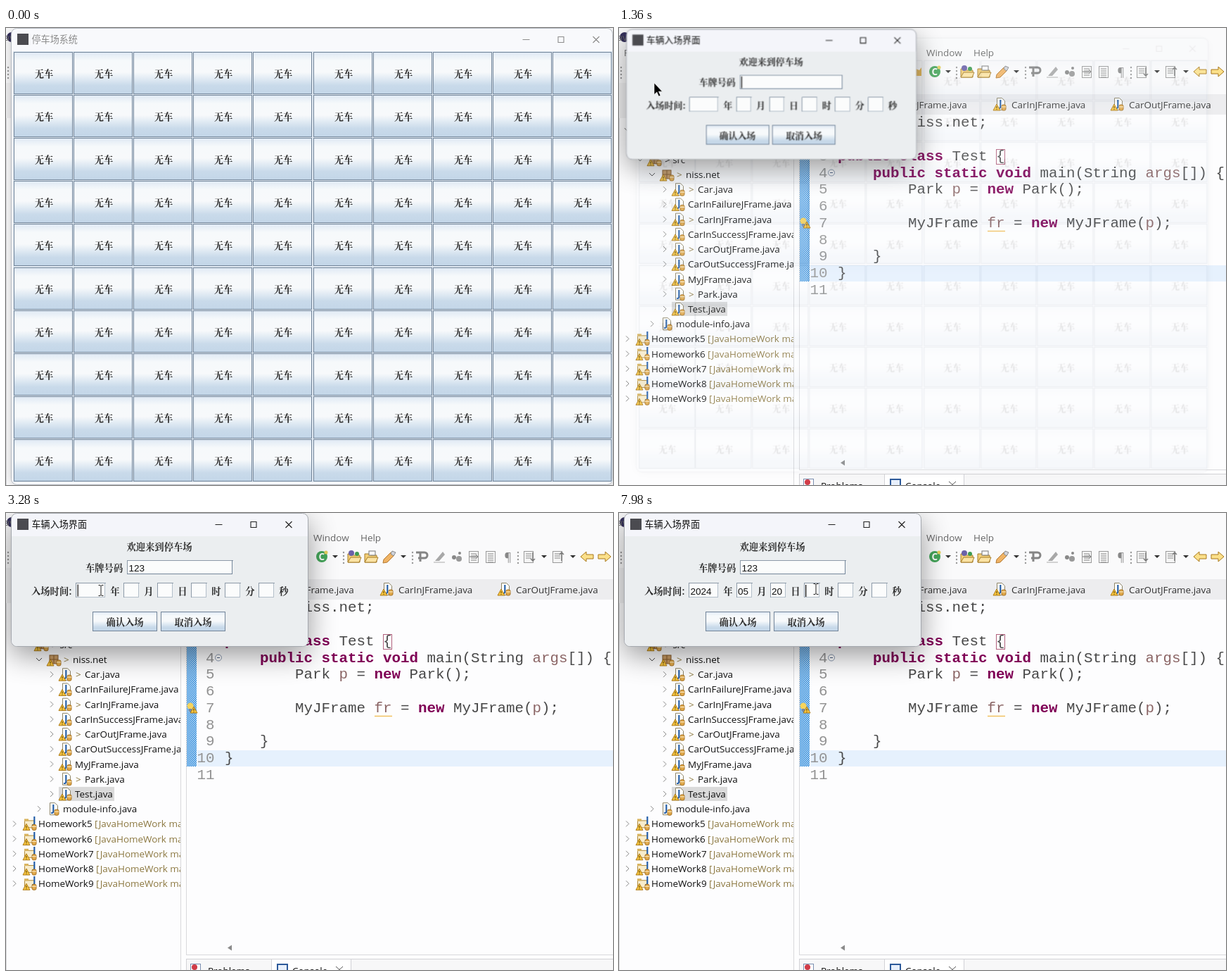
Recreate the animation shown at these times as an HTML page. Size 863x649 px, loop 8000 ms.

```html
<!DOCTYPE html>
<html lang="zh">
<head>
<meta charset="utf-8">
<title>停车场系统</title>
<style>
html, body { margin: 0; width: 100%; height: 100%; overflow: hidden; background: #fff; }
svg { display: block; width: 100%; height: 100%; }
text { white-space: pre; font: 13.45px "Open Sans", "Noto Sans", sans-serif; fill: #111; }
.menu { fill: #666; }
.tab { fill: #333; }
.decor { fill: #8c7840; }
.code { font: 20.83px "Liberation Mono", monospace; fill: #484848; }
.num { fill: #929292; text-anchor: end; }
.kw { font-weight: 700; fill: #7f0055; }
.var { fill: #8a6464; }
.j { font-weight: 700; font-size: 14px; fill: #1f5aa6; }
.title { font: 13.1px "Noto Sans CJK SC", "Noto Sans CJK", sans-serif; }
.song { font: 700 13.3px "Noto Serif CJK SC", "Noto Sans CJK SC", "Noto Sans CJK", serif; fill: #2b2b2b; }
.mid { text-anchor: middle; }
.field { font: 13.5px "Liberation Sans", sans-serif; }
.crisp { shape-rendering: crispEdges; }
#main { transform-origin: 355px 280px; }
#dialog { transform-origin: 142px 60px; }
</style>
</head>
<body>
<svg id="stage" viewBox="0 0 863 649" xmlns="http://www.w3.org/2000/svg"></svg>
<script>
const LOOP = 8000;
const sheet = [];

const range = n => [...Array(n).keys()];
const rect = (x, y, w, h, fill, more = '') =>
  `<rect x="${x}" y="${y}" width="${w}" height="${h}" fill="${fill}" ${more}/>`;
const path = (d, stroke, more = '') => `<path d="${d}" fill="none" stroke="${stroke}" ${more}/>`;
const shape = (d, fill, more = '') => `<path d="${d}" fill="${fill}" ${more}/>`;
const dot = (x, y, r, fill) => `<circle cx="${x}" cy="${y}" r="${r}" fill="${fill}"/>`;
const text = (x, y, s, cls = '', more = '') => `<text x="${x}" y="${y}" class="${cls}" ${more}>${s}</text>`;
const group = (id, body) => `<g id="${id}">${body}</g>`;

// Holds each declaration from its time until the next one.
function track(id, steps) {
  const frames = steps.map(([ms, css]) => `${+(ms / LOOP * 100).toFixed(4)}%{${css}}`).join('');
  sheet.push(`@keyframes ${id}{${frames}100%{${steps.at(-1)[1]}}}#${id}{animation:${id} ${LOOP}ms step-end infinite}`);
}
const showFrom = (id, ms) => track(id, [[0, 'opacity:0'], [ms, 'opacity:1']]);

// ---------- IDE behind the windows ----------
const warning = (x, y) =>
  shape(`M${x} ${y - 8}l5 9h-10z`, '#f6c540', 'stroke="#a8720c" stroke-width=".9"') +
  path(`M${x} ${y - 5}v3m0 1v1`, '#4a3500');
const drum = (x, y) =>
  rect(x, y, 6, 8, '#e0a94c', 'rx="2" stroke="#a06a1a" stroke-width=".9"') + path(`M${x} ${y + 3}h6`, '#fff2d0');
const fileIcon = (x, y, warn = true) =>
  shape(`M${x + 4.5} ${y - 8.5}h7l4 4v13h-11z`, '#fdfdfa', 'stroke="#8d8468"') +
  text(x + 7, y + 4, 'J', 'j') + drum(x + 11, y + 1) + (warn ? warning(x + 4, y + 8) : '');
const projectIcon = (x, y) =>
  rect(x + 2.5, y - 4.5, 14, 10, '#f8eccb', 'stroke="#b08a3a" rx="1"') + rect(x + 2, y - 7, 6, 3, '#d9b45e') +
  text(x + 14, y, 'J', 'j') + warning(x + 5, y + 8) + drum(x + 13, y + 1);
const packageIcon = (x, y) =>
  rect(x + 3, y - 6, 12, 12, '#c79a63', 'stroke="#855a2b"') + path(`M${x + 9} ${y - 6}v12M${x + 3} ${y}h12`, '#855a2b') +
  warning(x + 4, y + 8) + drum(x + 13, y + 1);
const chevron = (x, y, open) =>
  path(open ? `M${x - 4} ${y - 2}l4 4l4-4` : `M${x - 2} ${y - 4}l4 4l-4 4`, open ? '#444' : '#8a8a8a');

function tree() {
  const rowY = i => 144.3 + i * 21.22;
  const project = (i, name, open) => chevron(12, rowY(i), open) + projectIcon(24, rowY(i)) +
    text(46, rowY(i) + 5, `${name} <tspan class="decor">[JavaHomeWork main]</tspan>`);
  const files = ['> Car', 'CarInFailureJFrame', '> CarInJFrame', 'CarInSuccessJFrame', '> CarOutJFrame',
    'CarOutSuccessJFrame', 'MyJFrame', '> Park', 'Test'];
  let out = project(0, '&gt; HomeWork10', true);
  out += chevron(30, rowY(1)) + rect(43, rowY(1) - 5, 16, 10, '#5e7fa8') +
    text(63, rowY(1) + 5, 'JRE System Library <tspan class="decor">[JavaSE-17]</tspan>');
  out += chevron(30, rowY(2), true) + packageIcon(41, rowY(2)) + text(65, rowY(2) + 5, '&gt; src');
  out += chevron(47, rowY(3), true) + packageIcon(59, rowY(3)) +
    text(82, rowY(3) + 5, '&gt;', 'decor') + text(95, rowY(3) + 5, 'niss.net');
  files.forEach((name, i) => {
    const y = rowY(i + 4), changed = name.startsWith('>');
    if (name === 'Test') out += rect(75, y - 10, 79, 20, '#dadada');
    out += chevron(65, y) + fileIcon(76, y, name !== '> Park');
    if (changed) out += text(99, y + 5, '&gt;', 'decor');
    out += text(changed ? 112 : 98, y + 5, name.replace('> ', '') + '.java');
  });
  out += chevron(47, rowY(13)) + fileIcon(58, rowY(13), false) + text(81, rowY(13) + 5, 'module-info.java');
  ['Homework5', 'Homework6', 'HomeWork7', 'HomeWork8', 'HomeWork9'].forEach((n, i) => out += project(i + 14, n));
  return `<g clip-path="url(#treeClip)">${out}</g>`;
}

function editor() {
  const lineY = n => 116.4 + n * 23.78;
  const kw = s => `<tspan class="kw">${s}</tspan>`;
  const vr = s => `<tspan class="var">${s}</tspan>`;
  const code = (n, tabs, s) => text(311 + tabs * 50, lineY(n), s, 'code');
  return rect(272, 337, 591, 23, '#e6f1fd') + rect(257, 170, 14, 190, 'url(#hatch)') +
    range(11).map(i => text(296.5, lineY(i + 1), i + 1, 'code num')).join('') +
    code(1, 0, `${kw('package')} niss.net;`) +
    code(3, 0, `${kw('public')} ${kw('class')} Test {`) +
    code(4, 1, `${kw('public')} ${kw('static')} ${kw('void')} main(String ${vr('args')}[]) {`) +
    code(5, 2, `Park ${vr('p')} = ${kw('new')} Park();`) +
    code(7, 2, `MyJFrame ${vr('fr')} = ${kw('new')} MyJFrame(${vr('p')});`) +
    code(9, 1, '}') + code(10, 0, '}') +
    rect(536.5, 172.5, 12, 21, 'none', 'stroke="#b0607c"') + path('M524 288.5h25', '#f0c060', 'stroke-width="1.5"') +
    '<circle cx="302" cy="205.5" r="4.5" fill="#fff" stroke="#8796ae"/>' + path('M300 205.5h4', '#44597c') +
    dot(262, 274, 4.5, '#f8d45c') + rect(260, 278, 4, 4, '#7a8aa0') + warning(267, 283) +
    shape('M315 617.5l6-4v8z', '#8a8a8a');
}

function toolbar() {
  const grip = x => range(4).map(i => dot(x, 56 + i * 5, 1.2, '#999')).join('');
  const drop = x => shape(`M${x - 4} 60h8l-4 4z`, '#333');
  const folder = x => shape(`M${x - 9} 70v-12h6l2 2h9v10z`, '#f3cf78', 'stroke="#a67c27"') +
    shape(`M${x - 9} 70l4-7h15l-3 7z`, '#fbe3a4', 'stroke="#a67c27"');
  const page = (x, lines) => rect(x - 6.5, 54.5, 13, 16, '#f5f5f5', 'stroke="#999"') +
    path(range(lines).map(i => `M${x - 4} ${58 + i * 3}h8`).join(''), '#8a8a8a');
  const history = (tip, dir) =>
    shape(`M${tip} 62l${8 * dir}-7v4h${10 * dir}v6h${-10 * dir}v4z`, '#fbe08a', 'stroke="#a9791c"');
  const transfer = (x, up) => page(x, 3) +
    path(`M${x + 6} 56v12${up ? 'm-3-9l3-3l3 3' : 'm-3-3l3 3l3-3'}`, '#777', 'stroke-width="1.5"');
  return grip(3) + rect(162, 56, 13, 12, '#a8bcd6') + rect(202, 55, 15, 14, '#d9c48c') + rect(228, 56, 10, 12, '#aebccc') +
    [336, 373, 400].map(x => dot(x, 62, 8, '#3d9b50') + shape(`M${x - 3} 58l7 4l-7 4z`, '#fff')).join('') +
    [60, 356, 386, 416].map(drop).join('') + shape('M422 58l5 2l3-4v12h-8z', '#e2b04a') +
    dot(449, 62, 8, '#45a65a') + text(444.5, 67, 'C', '', 'style="fill:#fff;font-weight:700"') + dot(455, 56, 2.5, '#e7d15d') + drop(468) +
    grip(480) + folder(495) + dot(491, 57, 4, '#6a61a8') + dot(499, 58, 3, '#3d9b50') + folder(519) +
    rect(516, 54, 9, 6, '#f8f8f8', 'stroke="#777"') +
    shape('M537 66l10-10l5 4l-10 10l-6 1z', '#efb365', 'stroke="#b37830"') + shape('M549 54l5 2l-3 5l-4-3z', '#d0d4dc', 'stroke="#888"') + drop(565) +
    path('M583 56h12a4 4 0 0 1 0 8h-9M589 56v13', '#858585', 'stroke-width="3"') + grip(578) +
    shape('M610 68l11-13l3 4l-8 9z', '#a8a8a8') + path('M608 70h16', '#aaa') +
    dot(637, 63, 3, '#888') + dot(644, 65, 4, '#999') + dot(645, 57, 2, '#888') +
    page(665, 4) + path('M659 62h12l-3-3m3 3l-3 3', '#777') + page(689, 5) +
    text(708.5, 68, '¶', '', 'style="font-size:16px;fill:#888"') +
    grip(728) + transfer(743) + drop(765) + transfer(784, true) + drop(806) + history(817, 1) + history(860, -1);
}

function ide() {
  const menus = { File: 7, Edit: 45, Source: 84, Refactor: 141, Navigate: 210, Search: 281, Project: 338, Run: 398, Window: 437, Help: 504 };
  const tabs = { 'Park.java': 287, 'MyJFrame.java': 404, 'CarInJFrame.java': 558, 'CarOutJFrame.java': 725 };
  return rect(0, 0, 863, 649, '#fdfdfe') + rect(0, 0, 863, 94, '#fafafb') + rect(0, 78, 248, 50, '#f1f1f2') +
    rect(0, 128, 248, 521, '#fdfdfe') + rect(257, 94, 606, 29, '#ededef') + rect(257, 123, 606, 504, '#fdfdfe') +
    dot(8, 13, 7, '#35305c') +
    text(403, 18, 'JavaHomeWork - HomeWork10/src/niss/net/Test.java - Eclipse IDE', 'menu', 'text-anchor="end"') +
    Object.entries(menus).map(([s, x]) => text(x, 40, s, 'menu')).join('') + toolbar() +
    text(30, 100, 'Package Explorer', 'menu') + path('M151 92l7 7m0-7l-7 7', '#888') +
    Object.entries(tabs).map(([s, x]) => fileIcon(x - 25, 108) + text(x, 113.5, s, 'tab')).join('') +
    tree() + editor() +
    path('M.5 128V649M248.5 90V649M256.5 94V627.5H863', '#d9d9dc', 'class="crisp"') +
    rect(257, 633, 606, 16, '#f7f7f8') + rect(377, 633, 113, 16, '#fff') +
    path('M256.5 649V633.5H863M377.5 633v16M490.5 633v16', '#d2d2d6', 'class="crisp"') +
    rect(262.5, 640.5, 14, 12, '#fff', 'stroke="#7a8eb0"') + dot(268, 645, 4, '#d03c48') +
    rect(386, 641, 14, 11, '#e8f0fc', 'stroke="#2d5a9a" stroke-width="2"') +
    text(287, 655, 'Problems') + text(407, 655, 'Console') + path('M469 644l10 9m0-9l-10 9', '#555');
}

// ---------- Swing windows ----------
const controls = (x, color) =>
  path(`M${x} 16.5h10M${x + 50.5} 12.5h8v8h-8zM${x + 100} 12l9 9m0-9l-9 9`, color, 'stroke-width="1.1"');
const appIcon = rect(16, 8, 16, 16, '#4b4b50');
const metal = (x, y, w, h) => rect(x + .5, y + .5, w - 1, h - 1, 'url(#ocean)', 'stroke="#74869a" class="crisp"');
const shadow = (x, y, w, h, opacity, blur) => rect(x, y, w, h, '#000', `rx="8" opacity="${opacity}" filter="url(#${blur})"`);

function mainWindow() {
  const cells = range(100).map(i => [Math.round(11 + i % 10 * 85.1), Math.round(34 + (i / 10 | 0) * 61.1)]);
  return shadow(7, 4, 856, 645, .22, 'nearBlur') + rect(7.5, .5, 855, 648, '#f8f9fc', 'rx="8" stroke="#b4b9c0"') + appIcon +
    text(36.5, 21, '停车场系统', 'title', 'style="fill:#8c8c8c"') + controls(734.5, '#8c8c8c') +
    group('active', text(36.5, 21, '停车场系统', 'title')) +
    rect(10, 33, 852, 612, '#dfe8f1') +
    cells.map(([x, y]) => metal(x, y, 84, 60)).join('') +
    rect(12.5, 35.5, 81, 57, 'none', 'id="hover" stroke="#b2cae2" stroke-width="2"') +
    rect(11.5, 34.5, 83, 59, '#bfd3e6', 'id="press" stroke="#74869a"') +
    cells.map(([x, y]) => text(x + 43, y + 36, '无车', 'song mid')).join('');
}

function dialogWindow() {
  const input = (x, y, w, h) => rect(x + .5, y + .5, w - 1, h - 1, '#fbfcfc', 'stroke="#b4bfca" class="crisp"') +
    path(`M${x + .5} ${y + h}v${-h + .5}h${w}`, '#8d9aa8', 'class="crisp"');
  const typed = [
    ['123', 174.5, 82.5, [2530, 2640, 2750]],
    ['2024', 101.5, 115.5, [4040, 4280, 5210, 5440]],
    ['05', 169, 115.5, [6090, 6380]],
    ['20', 217, 115.5, [7310, 7480]]
  ];
  const digits = typed.flatMap(([s, x, y, times], row) => times.map((ms, i) => {
    const id = `digit${row}${i}`;
    showFrom(id, ms);
    return text(x + i * 7.5, y, s[i], 'field', `id="${id}"`);
  })).join('');
  return shadow(7, 12, 423, 190, .4, 'farBlur') + rect(7.5, .5, 422, 189, '#f4f5fa', 'rx="8" stroke="#a4a8ae"') +
    shape('M8 33H429V181a8 8 0 0 1-8 8H16a8 8 0 0 1-8-8z', '#ebeef0') + appIcon +
    text(36.5, 21, '车辆入场界面', 'title') + controls(297.5, '#222') +
    text(218, 52.5, '欢迎来到停车场', 'song mid') + text(113, 82.5, '车牌号码', 'song') + input(172, 67, 150, 20) +
    path('M172 86.5h150M321.5 67v20', '#74869a', 'class="crisp"') +
    text(36, 116, '入场时间:', 'song') + input(99, 99, 42, 21) +
    range(5).map(i => input(167 + i * 48, 99, 22, 21)).join('') +
    [...'年月日时分秒'].map((s, i) => text(155 + i * 48, 116, s, 'song mid')).join('') +
    metal(123, 140, 92, 28) + metal(220, 140, 92, 28) +
    text(169, 159.5, '确认入场', 'song mid') + text(266, 159.5, '取消入场', 'song mid') +
    digits + rect(0, 0, 1.3, 17, '#111', 'id="caret"');
}

const cursor = group('cursor',
  group('arrow', shape('M0 0V16.5L3.8 13L6.5 19L9 18L6.4 12.2H11.5Z', '#000', 'stroke="#fff" stroke-width=".6"')) +
  group('beam', path('M-3.5-7.5h2.5l1 1l1-1h2.500M0-7V7M-3.5 7.500h2.500l1-1l1 1h2.500', '#222')));

const blur = (id, deviation) =>
  `<filter id="${id}" filterUnits="userSpaceOnUse" x="-100" y="-100" width="1080" height="860"><feGaussianBlur stdDeviation="${deviation}"/></filter>`;

document.getElementById('stage').innerHTML = `<defs>
  <linearGradient id="ocean" x2="0" y2="1">
    <stop offset="0" stop-color="#dfe9f4"/><stop offset=".2" stop-color="#f6f9fb"/>
    <stop offset=".48" stop-color="#f7f9fb"/><stop offset=".66" stop-color="#dde8f2"/>
    <stop offset=".8" stop-color="#c9daea"/><stop offset="1" stop-color="#c3d6e8"/>
  </linearGradient>
  <pattern id="hatch" width="3" height="3" patternUnits="userSpaceOnUse">
    <rect width="3" height="3" fill="#d5e9fa"/><path d="M0 0h1.5v3h1.5v-1.5h-3z" fill="#1c80d6"/>
  </pattern>
  <clipPath id="treeClip"><path d="M0 128H248V649H0z"/></clipPath>
  ${blur('nearBlur', 8)}${blur('farBlur', 20)}
</defs>` + ide() + group('main', mainWindow()) + group('dialog', dialogWindow()) + cursor;

// ---------- Timing ----------
const scaled = (opacity, scale) => `opacity:${opacity};transform:scale(${scale})`;
track('main', [[0, scaled(1, 1)], [1270, scaled(.8, .993)], [1360, scaled(.13, .951)], [1410, scaled(.03, .93)], [1460, scaled(0, .92)]]);
track('dialog', [[0, scaled(0, .87)], [1270, scaled(.22, .891)], [1360, scaled(1, .976)], [1410, scaled(1, .994)], [1460, scaled(1, 1)]]);
showFrom('active', 1130);
showFrom('press', 1130);

const place = (x, y, opacity = 1) => `opacity:${opacity};transform:translate(${x}px,${y}px)`;
const pointer = [[0, place(335, 660, 0)]];
const hover = [[0, place(0, 0, 0)]];
function glide(start, end, count, [x0, y0], [x1, y1], ease, visit) {
  range(count).forEach(i => {
    const k = i / (count - 1), u = ease(k), ms = start + (end - start) * k;
    const x = x0 + (x1 - x0) * u, y = y0 + (y1 - y0) * u;
    pointer.push([ms, place(x.toFixed(1), y.toFixed(1))]);
    if (visit) visit(ms, x, y);
  });
}
const easeOut = k => Math.sin(k * Math.PI / 2);
const easeBoth = k => (1 - Math.cos(k * Math.PI)) / 2;
const cellStart = (value, origin, pitch) => Math.round(Math.floor((value - origin) / pitch) * pitch);
glide(290, 950, 10, [335, 638], [50, 78], easeOut, (ms, x, y) =>
  hover.push([ms, place(cellStart(x, 11, 85.1), cellStart(y, 34, 61.1))]));
glide(1460, 1920, 9, [50, 78], [167, 83], easeBoth);
glide(2800, 3220, 9, [167, 83], [135, 110], easeBoth);
glide(5500, 5680, 4, [135, 110], [184, 111], easeBoth);
glide(6430, 6980, 11, [184, 111], [232, 109], easeBoth);
glide(7530, 7930, 9, [232, 109], [280, 108], easeBoth);
track('cursor', pointer);
track('hover', hover);

const beamSwitch = [0, 3060, 5550, 5620, 6580, 6760, 7640, 7790];
track('arrow', beamSwitch.map((ms, i) => [ms, `opacity:${1 - i % 2}`]));
track('beam', beamSwitch.map((ms, i) => [ms, `opacity:${i % 2}`]));

const off = place(0, 0, 0);
const plate = n => place(174.5 + n * 7.5, 69);
const time = (x, n) => place(x + n * 7.5, 101.5);
track('caret', [
  [0, plate(0)], [1850, off], [2310, plate(0)], [2530, plate(1)], [2640, plate(2)], [2750, plate(3)],
  [3280, time(101.5, 0)], [3810, off], [4040, time(101.5, 1)], [4280, time(101.5, 2)], [4740, off],
  [5210, time(101.5, 3)], [5440, time(101.5, 4)],
  [5920, time(169, 0)], [6090, time(169, 1)], [6380, time(169, 2)], [6860, off],
  [7130, time(217, 0)], [7310, time(217, 1)], [7480, time(217, 2)], [7980, time(265, 0)]
]);

const style = document.createElement('style');
style.textContent = sheet.join('\n');
document.head.append(style);
</script>
</body>
</html>
```
